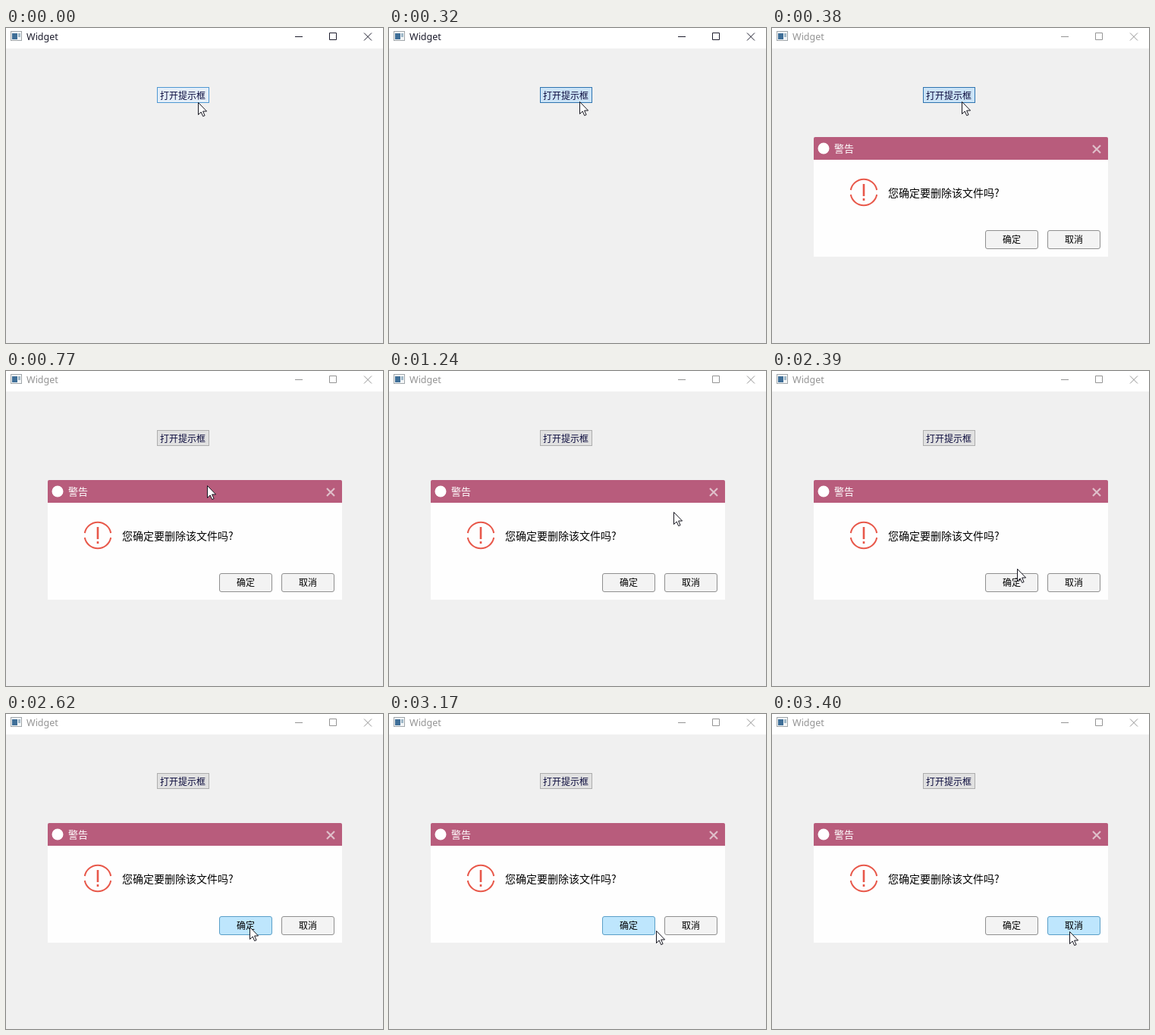
These frames come from a looping animation (497 by 416 pixels, 4260 ms). An HTML page:

```html
<!DOCTYPE html>
<html lang="zh-CN">
<head>
<meta charset="utf-8">
<style>
html, body { margin: 0; width: 100%; height: 100%; overflow: hidden; background: #f0f0f0; }
svg { display: block; font: 12px "Noto Sans CJK SC", "Noto Sans CJK", sans-serif; }
.frame { fill: none; stroke: currentColor; }
#chrome { color: #1c1c2c; }
#chrome.inactive { color: #949494; }
#chrome text { font: 12.5px "Noto Sans", sans-serif; fill: currentColor; }
#open rect { fill: #e1e1e1; stroke: #adadad; }
#open.hover rect { fill: #e5eff9; stroke: #4f98d2; }
#open.pressed rect { fill: #cce4f7; stroke: #2f74b0; }
#open text { fill: #0a0a3c; }
.button rect { fill: #f3f3f3; stroke: #8f8f8f; }
.button.hover rect { fill: #bee6fd; stroke: #5a9fc8; }
.button text { text-anchor: middle; }
#close rect { fill: none; }
#close path { stroke: #dfbfca; stroke-width: 2.2; }
#close.hover rect { fill: #c71d27; }
#close.hover path { stroke: #ecd2d2; }
</style>
</head>
<body>
<svg width="497" height="416" viewBox="0 0 497 416">
  <rect width="497" height="416" fill="#f0f0f0"/>
  <rect width="497" height="27" fill="#fff"/>
  <g id="chrome">
    <rect x="6.5" y="4.5" width="14" height="12" fill="#f4f6f7" stroke="#a0a6aa"/>
    <rect x="8" y="7" width="7" height="8" fill="#3f6f98"/>
    <rect x="16" y="7" width="3" height="5" fill="#9fb8c8"/>
    <text x="27" y="16">Widget</text>
    <path class="frame" d="M381 11.5h10M426.5 6.5h9v9h-9zM472 6.5l10 10M482 6.5l-10 10"/>
  </g>
  <g id="open">
    <rect x="199.5" y="78.5" width="68" height="20"/>
    <text x="203" y="94">打开提示框</text>
  </g>
  <g id="dialog">
    <rect x="55" y="146" width="388" height="156" fill="#fefefe"/>
    <path d="M55 174v-28q0-2 2-2h384q2 0 2 2v28z" fill="#b85c7c"/>
    <circle cx="68" cy="159" r="7.5" fill="#fff"/>
    <text x="82" y="164" font-size="13" fill="#fff">警告</text>
    <g id="close">
      <rect x="413" y="144" width="30" height="30"/>
      <path d="M423 155l10 10M433 155l-10 10"/>
    </g>
    <g fill="none" stroke="#e8584a" stroke-width="2">
      <path d="M103.8 214a17.5 17.5 0 0 1 34.4 0M103.8 220a17.5 17.5 0 0 0 34.4 0"/>
      <path d="M121 206v16M121 225v3" stroke-width="2.6"/>
    </g>
    <text x="153" y="223" font-size="14">您确定要删除该文件吗?</text>
    <g id="ok" class="button">
      <rect x="281.5" y="267.5" width="69" height="24" rx="2.5"/>
      <text x="316" y="284">确定</text>
    </g>
    <g id="cancel" class="button">
      <rect x="363.5" y="267.5" width="69" height="24" rx="2.5"/>
      <text x="398" y="284">取消</text>
    </g>
  </g>
  <path id="cursor" d="M.5.5v16l3.7-3.5 2.5 5.6 2.4-1-2.5-5.6h5z" fill="#fff" stroke="#15151f"/>
</svg>
<script>
const LOOP = 4260, PRESS = 230, OPEN = 380;
const $ = id => document.getElementById(id);

// Cursor moves: start, number of steps, ms per step, end x, end y
const moves = [
  [70, 5, 77, 250, 97],
  [460, 2, 90, 251, 97],
  [610, 7, 80, 283, 223],
  [1150, 2, 90, 375, 186],
  [1300, 5, 80, 426, 162],
  [1930, 1, 80, 416, 173],
  [2010, 6, 76, 323, 261],
  [2470, 3, 75, 321, 281],
  [2940, 4, 76, 352, 286],
  [3250, 3, 75, 392, 287]
];

function cursorAt(t) {
  let x = 253, y = 98;
  for (const [start, steps, ms, toX, toY] of moves) {
    if (t < start) break;
    const p = Math.min(steps, Math.floor((t - start) / ms) + 1) / steps;
    x += (toX - x) * p;
    y += (toY - y) * p;
  }
  return [Math.round(x), Math.round(y)];
}

function draw(t) {
  const [x, y] = cursorAt(t);
  const over = (left, top, right, bottom) => x >= left && x <= right && y >= top && y <= bottom;
  const toggle = (id, name, on) => $(id).classList.toggle(name, on);
  const shown = t >= OPEN, onOpen = over(199, 78, 268, 99);
  toggle("chrome", "inactive", shown);
  toggle("open", "hover", onOpen);
  toggle("open", "pressed", onOpen && t >= PRESS);
  toggle("close", "hover", over(413, 144, 443, 174));
  toggle("ok", "hover", over(281, 267, 352, 292));
  toggle("cancel", "hover", over(363, 267, 433, 292));
  $("dialog").style.display = shown ? "" : "none";
  $("cursor").setAttribute("transform", `translate(${x} ${y})`);
}

const begin = performance.now();
function tick() {
  draw((performance.now() - begin) % LOOP);
  requestAnimationFrame(tick);
}
tick();
</script>
</body>
</html>
```
